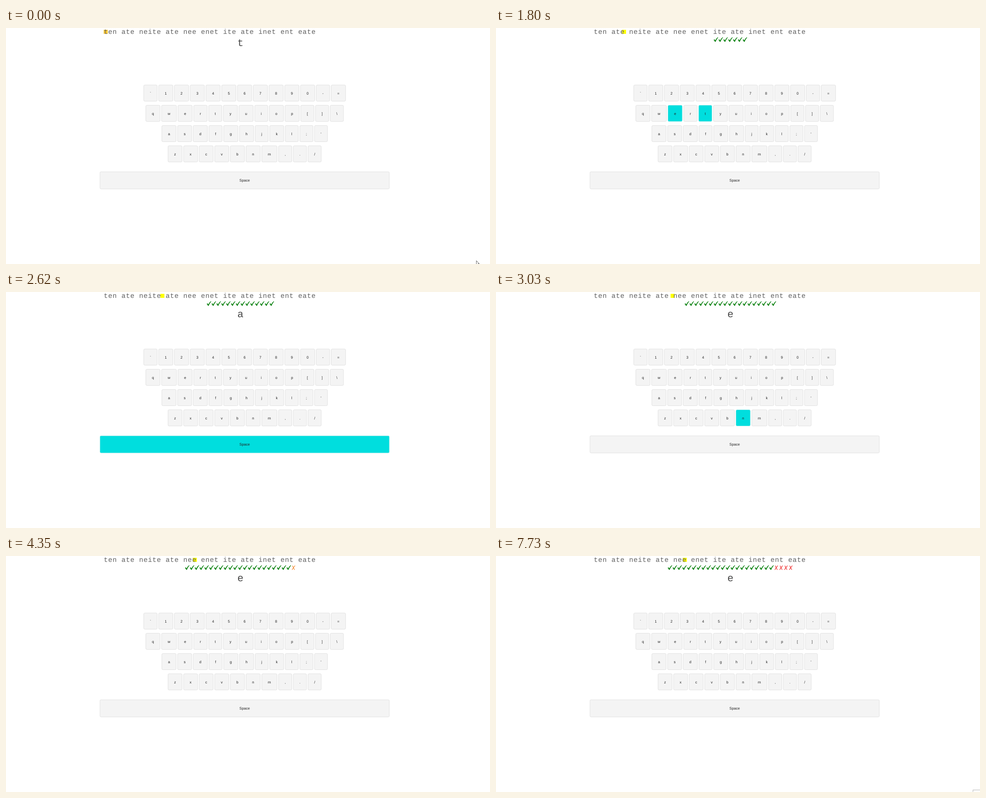
An HTML page for the animation above (7940 ms loop, 1068x524 px).

```html
<!DOCTYPE html>
<html lang="en">
<head>
<meta charset="utf-8">
<title>Typing practice</title>
<style>
  html, body { margin: 0; width: 100%; height: 100%; overflow: hidden; background: #fff; }
  svg { display: block; width: 1068px; height: 524px; }
  text { text-rendering: geometricPrecision; white-space: pre; }
  .line, .next { font-family: "Liberation Mono", monospace; }
  .line { font-size: 15px; letter-spacing: .75px; fill: #606060; }
  .next { font-size: 22.5px; text-anchor: middle; fill: #484848; }
  .key rect { fill: #f4f4f4; stroke: #e1e1e1; }
  .key text { font: 8.125px "Liberation Sans", sans-serif; text-anchor: middle; fill: #222; }
  .key.lit rect { fill: #00dede; stroke: #9fe9e9; }
  .check { fill: #0a800f; }
  .cross { fill: none; stroke: #ee2020; stroke-width: 1.15; }
  .cross.first { stroke: #f08020; }
  .pointer { fill: #fff; stroke: #333; stroke-width: .8; }
  .corner { fill: #fff; stroke: #b4b4b4; }
</style>
</head>
<body>
<svg viewBox="0 0 1068 524">
  <rect id="mark" y="4" width="8.9" height="9"/>
  <text id="line" class="line" x="215.7" y="12.5"></text>
  <text id="next" class="next" x="517.3"></text>
  <g id="results"></g>
  <g id="keys"></g>
  <path id="pointer" class="pointer" d="M.5 .7V10L2.6 8L4.1 11.2L5.4 10.6L4 7.4H6.8Z"/>
  <rect id="corner" class="corner" x="1052.5" y="519.5" width="30" height="20"/>
</svg>
<script>
const LOOP = 7940;
const LESSON = "ten ate neite ate nee enet ite ate inet ent eate";
const ROWS = ["`1234567890-=", "qwertyuiop[]\\", "asdfghjkl;'", "zxcvbnm,./"];
const FONT = 8.125, PADDING = 28, CENTER = 526.6, RESULT_PITCH = 10.67;
const CHECK = "M.3 5.8L2.1 4.6L3.7 7.2Q6 2.6 9.2 0L10.2 .5Q6.5 4.8 4.6 10.1H3Z";
const CROSS = "M1.8 10.3Q4.4 5.4 8.4 .8M2.7 1Q4.6 5.4 7.4 10.3";

// [key, time down, time held]
const presses = [
  ["t", 1190, 130], ["e", 1260, 130], ["n", 1390, 130], [" ", 1460, 130],
  ["a", 1590, 130], ["t", 1660, 270], ["e", 1800, 200], [" ", 1930, 130],
  ["n", 2070, 130], ["e", 2130, 130], ["i", 2270, 130], ["t", 2340, 130],
  ["e", 2480, 130], [" ", 2620, 130], ["a", 2680, 130], ["t", 2750, 130],
  ["e", 2820, 130], [" ", 2890, 130], ["n", 3030, 130], ["e", 3160, 70],
  ["e", 3290, 70], [" ", 3820, 70],
  ["o", 4220, 130], ["o", 4620, 60], ["o", 4950, 70], ["h", 5280, 130]
];
const CORRECT = 22;

// [time, x, y]; without a place the pointer is hidden
const pointerStops = [
  [0, 1037.5, 516], [70, 1020, 490], [190, 1002, 463], [330, 998, 459], [460, 994, 456],
  [1190], [6400, 1006, 473], [6470, 1018, 490], [6540, 1029, 508], [6610]
];

const $ = id => document.getElementById(id);
function add(parent, tag, attrs, text = "") {
  const el = document.createElementNS("http://www.w3.org/2000/svg", tag);
  for (const name in attrs) el.setAttribute(name, attrs[name]);
  el.textContent = text;
  return parent.appendChild(el);
}
const show = (el, on) => { el.style.display = on ? "" : "none"; };

const ruler = document.createElement("canvas").getContext("2d");
ruler.font = '100px "Liberation Sans", sans-serif';
const textWidth = s => ruler.measureText(s).width / 100 * FONT;

const keys = {};
function addKey(id, label, x, y, width, height) {
  const g = add($("keys"), "g", { class: "key" });
  add(g, "rect", { x: x + .5, y: y + .5, width: width - 1, height: height - 1, rx: 2.5 });
  add(g, "text", { x: x + width / 2, y: y + height / 2 + 3 }, label);
  keys[id] = g;
}

ROWS.forEach((row, r) => {
  const gap = textWidth(" ");
  const widths = [...row].map(c => textWidth(c) + PADDING);
  const total = widths.reduce((a, b) => a + b) + gap * (row.length - 1);
  let x = CENTER - total / 2;
  widths.forEach((w, i) => {
    addKey(row[i], row[i], x, 126 + 45 * r, w, 37);
    x += w + gap;
  });
});
addKey(" ", "Space", CENTER - 319.75, 318.8, 639.5, 39);

$("line").textContent = LESSON;
const results = presses.map((_, i) => add($("results"), "path", {
  class: i < CORRECT ? "check" : "cross",
  d: i < CORRECT ? CHECK : CROSS,
  transform: `translate(${i * RESULT_PITCH} 0)`
}));

function draw(t) {
  const count = presses.filter(p => p[1] <= t).length;
  const place = Math.min(count, CORRECT);

  $("mark").setAttribute("x", 215.6 + 8.93 * place);
  $("mark").setAttribute("fill", count ? "#ffff00" : "#fcc832");
  $("next").textContent = LESSON[place];
  $("next").setAttribute("y", count ? 55.5 : 40);

  $("results").setAttribute("transform", `translate(${517.4 - count * RESULT_PITCH / 2} 20.5)`);
  results.forEach((el, i) => show(el, i < count));
  results[CORRECT].classList.toggle("first", count === CORRECT + 1);

  const held = new Set(presses.filter(p => t >= p[1] && t < p[1] + p[2]).map(p => p[0]));
  for (const id in keys) keys[id].classList.toggle("lit", held.has(id));

  const [, x, y] = pointerStops.filter(s => s[0] <= t).pop();
  show($("pointer"), x !== undefined);
  if (x !== undefined) $("pointer").setAttribute("transform", `translate(${x} ${y})`);
  show($("corner"), t >= 7730);
}

function tick() {
  draw(performance.now() % LOOP);
  requestAnimationFrame(tick);
}
draw(0);
requestAnimationFrame(tick);
</script>
</body>
</html>
```
